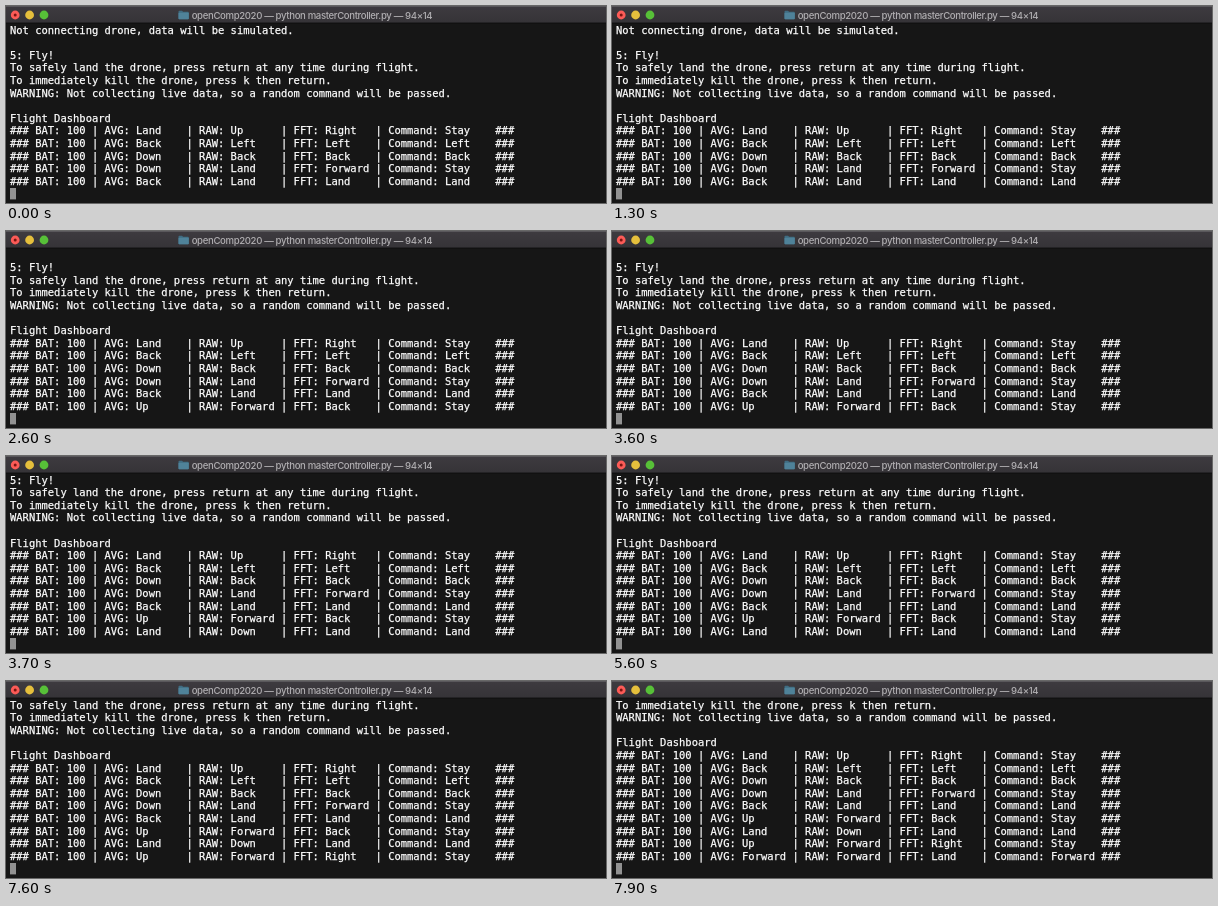
An HTML page for the animation above (8000 ms loop, 600x197 px).

```html
<!DOCTYPE html>
<html lang="en">
<head>
<meta charset="utf-8">
<title>Flight dashboard</title>
<style>
html, body { margin: 0; width: 100%; height: 100%; overflow: hidden; background: #161616; }
svg { display: block; width: 600px; height: 197px; }
.term text { font: 10.47px "DejaVu Sans Mono", monospace; fill: #fff; stroke: #fff; stroke-width: .25px; white-space: pre; }
.title { font: 500 9.6px Inter, sans-serif; letter-spacing: -.36px; fill: #b0aeb1; }
</style>
</head>
<body>
<svg viewBox="0 0 600 197">
  <defs>
    <linearGradient id="bar" x1="0" y1="0" x2="0" y2="1">
      <stop offset="0" stop-color="#3e3b40"/>
      <stop offset="1" stop-color="#353337"/>
    </linearGradient>
  </defs>
  <rect width="600" height="197" fill="#161616"/>
  <rect width="600" height="17" fill="url(#bar)"/>
  <rect width="600" height="1" fill="#5a585c"/>
  <rect y="16.6" width="600" height=".8" fill="#0c0c0c"/>
  <circle cx="9.2" cy="9" r="4.4" fill="#fc5b57"/>
  <circle cx="9.2" cy="9" r="1.5" fill="#7a1411"/>
  <circle cx="23.6" cy="9" r="4.4" fill="#e5bf3c"/>
  <circle cx="38" cy="9" r="4.4" fill="#57c038"/>
  <path d="M172.5 5.6q0-.9.9-.9h2.7l1 1h4.9q.8 0 .8.8v6q0 .8-.8.8h-8.7q-.8 0-.8-.8z" fill="#3f6c82"/>
  <rect x="172.5" y="6.7" width="10.3" height="6.6" rx=".7" fill="#4f8299"/>
  <text class="title" x="306" y="12.5" text-anchor="middle">openComp2020 — python masterController.py — 94×14</text>
  <g id="term" class="term"></g>
  <rect x="4" y="182" width="6" height="11.4" fill="#929292"/>
</svg>
<script>
const LOOP = 8000, ROWS = 13, PITCH = 12.58;
const scrollTimes = [1700, 3700, 5700, 7700];

const flight = [
  "Land Up Right Stay",
  "Back Left Left Left",
  "Down Back Back Back",
  "Down Land Forward Stay",
  "Back Land Land Land",
  "Up Forward Back Stay",
  "Land Down Land Land",
  "Up Forward Right Stay",
  "Forward Forward Land Forward"
].map(row => {
  const [avg, raw, fft, cmd] = row.split(" ").map(word => word.padEnd(7));
  return `### BAT: 100 | AVG: ${avg} | RAW: ${raw} | FFT: ${fft} | Command: ${cmd} ###`;
});

const lines = [
  "Not connecting drone, data will be simulated.",
  "",
  "5: Fly!",
  "To safely land the drone, press return at any time during flight.",
  "To immediately kill the drone, press k then return.",
  "WARNING: Not collecting live data, so a random command will be passed.",
  "",
  "Flight Dashboard",
  ...flight
];

const term = document.getElementById("term");
const rows = Array.from({ length: ROWS }, (_, i) => {
  const row = document.createElementNS("http://www.w3.org/2000/svg", "text");
  row.setAttribute("x", 4);
  row.setAttribute("y", 27.7 + i * PITCH);
  return term.appendChild(row);
});

let shown = -1;
function render(time) {
  const top = scrollTimes.filter(t => time >= t).length;
  if (top === shown) return;
  shown = top;
  rows.forEach((row, i) => { row.textContent = lines[top + i]; });
}

const start = performance.now();
function tick(now) {
  render(Math.max(0, now - start) % LOOP);
  requestAnimationFrame(tick);
}
render(0);
requestAnimationFrame(tick);
</script>
</body>
</html>
```
